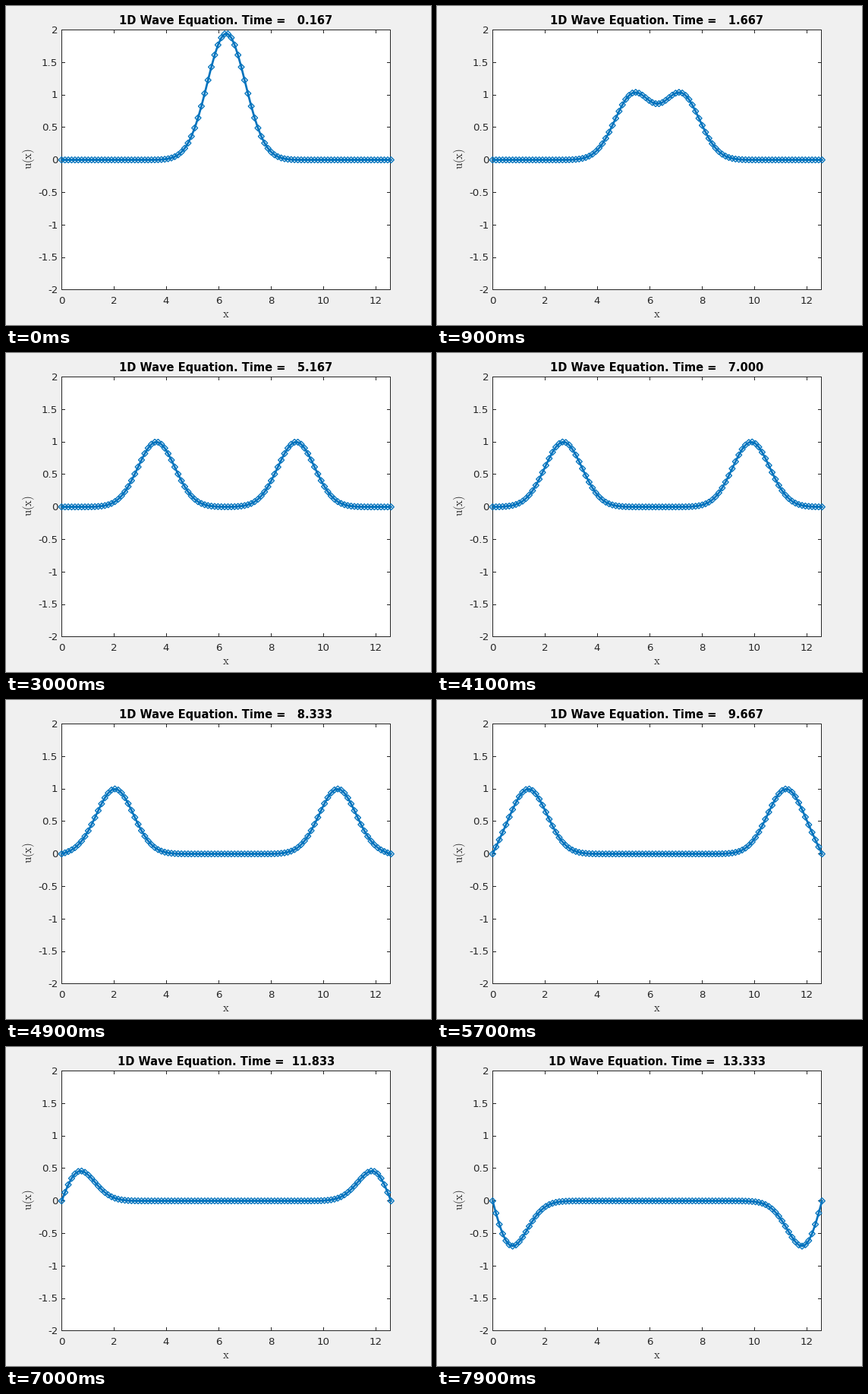
Animation of 560x420 px, one loop 8000 ms. Source, as a matplotlib script:

```python
import numpy as np
import matplotlib.pyplot as plt
from matplotlib.animation import FuncAnimation
from matplotlib.collections import LineCollection
from matplotlib.patches import Rectangle

plt.rcParams["font.family"] = "DejaVu Sans"
plt.rcParams["mathtext.fontset"] = "cm"

W, H, DPI = 560, 420, 96
PX = 72 / DPI                      # one pixel in points
INK, BLUE = "#262626", "#0072BD"
LEFT, RIGHT, TOP, BOTTOM = 73.5, 506.5, 31.5, 373.5
FRAMES, STEP = 80, 100
DT, SPEED, LENGTH = 1 / 6, 0.5, 4 * np.pi

fig = plt.figure(figsize=(W / DPI, H / DPI), dpi=DPI, facecolor="#f0f0f0")
ax = fig.add_axes([0, 0, 1, 1])
ax.set(xlim=(0, W), ylim=(H, 0))
ax.axis("off")


def px(x):
    return 73.3 + 434 * x / LENGTH


def py(u):
    return 202.65 - 85.575 * u


def segment(x0, y0, x1, y1):
    ax.plot([x0, x1], [y0, y1], color=INK, lw=PX,
            solid_capstyle="butt", snap=False)


def label(x, y, s, **kw):
    style = dict(size=10, color=INK, ha="center", va="baseline")
    return ax.text(x, y, s, **{**style, **kw})


# Axes box, ticks and labels
ax.add_patch(Rectangle((LEFT, TOP), RIGHT - LEFT, BOTTOM - TOP, fc="white",
                       ec=INK, lw=PX, joinstyle="miter", snap=False))
for v in range(0, 13, 2):
    x = px(v)
    c = np.floor(x) + 0.5
    segment(c, BOTTOM, c, BOTTOM - 4.5)
    segment(c, TOP, c, TOP + 4.5)
    label(x - 0.4, 392, str(v))
for v in np.arange(-2, 2.5, 0.5):
    y = py(v)
    c = np.floor(y) + 0.5
    segment(LEFT, c, LEFT + 4.5, c)
    segment(RIGHT, c, RIGHT - 4.5, c)
    label(68.3, y + 4.4, f"{v:g}", ha="right")
label(290, 410, r"$\mathrm{x}$", size=11)
label(40.5, 201, r"$\mathrm{u(x)}$", size=11, rotation=90, ha="right", va="center")
title = label(289.8, 24, "", size=11, weight="bold", color="black")

# Wave: two travelling pulses plus their inverted wall reflections
grid = np.linspace(0, LENGTH, 100)
diamond = 4 * np.array([(0.5, -0.5), (1, 0), (0, 1), (-1, 0), (0, -1), (0.5, -0.5)])
curve, = ax.plot([], [], color=BLUE, lw=2, zorder=5, solid_joinstyle="round")
marks = LineCollection([], colors=BLUE, linewidths=1, zorder=6,
                       joinstyle="miter", capstyle="butt")
ax.add_collection(marks, autolim=False)


def pulse(center):
    return np.exp(-(grid - center) ** 2)


def wave(t):
    s = SPEED * (t + DT)
    mid = LENGTH / 2
    return (pulse(mid - s) + pulse(mid + s)
            - pulse(s - mid) - pulse(3 * mid - s))


def update(i):
    t = (i + 1) * DT
    points = np.column_stack([px(grid), py(wave(t))])
    curve.set_data(*points.T)
    marks.set_segments(points[:, None, :] + diamond)
    title.set_text(f"1D Wave Equation. Time = {t:7.3f}")
    return curve, marks, title


anim = FuncAnimation(fig, update, frames=FRAMES, interval=STEP,
                     repeat=True, repeat_delay=0)
plt.show()
```
